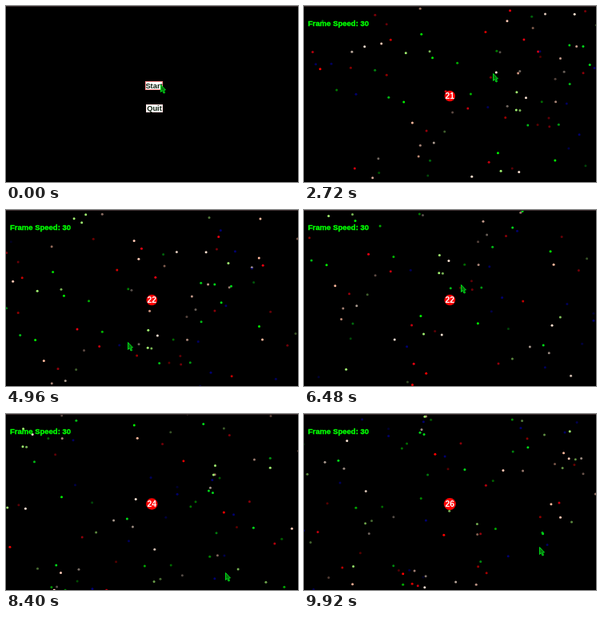
An HTML page with a canvas that plays this animation: 365 by 220 pixels, repeating every 10 s.

```html
<!DOCTYPE html>
<html lang="en">
<head>
<meta charset="utf-8">
<title>Dots</title>
<style>
html, body { margin: 0; width: 100%; height: 100%; overflow: hidden; background: #000; }
canvas { display: block; }
</style>
</head>
<body>
<canvas id="stage" width="365" height="220"></canvas>
<script>
const W = 365, H = 220, LOOP = 10000, STEP = 80;
const PLAY = 640, MOVE = 1120;
const SPEED = 6.9;        // pixels per step
const DENSITY = 92;       // dots per screen area
const CENTER = { x: 182.3, y: 112.5 };
const ctx = document.getElementById('stage').getContext('2d');

// Key points of the pointer tip: time, x, y
const pointerKeys = [
  [MOVE, 189, 97], [1600, 236, 84], [2720, 236, 84], [3680, 236, 88],
  [3920, 228, 139], [4480, 170, 75], [4960, 152, 165], [5760, 180, 175],
  [6480, 196, 93], [7440, 250, 130], [8400, 274, 198], [9920, 294, 166]
];
const scoreTimes = [1920, 3280, 7280, 8000, 8960, 9440];
const palette = ['#ffc8b4', '#ffb89c', '#f8e0d0', '#ff0000', '#e80010', '#00f000', '#00d818', '#a0f070', '#000070'];

function pointerAt(t) {
  const i = pointerKeys.findIndex(key => key[0] > t);
  const b = pointerKeys.at(i), a = i > 0 ? pointerKeys[i - 1] : b;
  const k = a === b ? 0 : (t - a[0]) / (b[0] - a[0]);
  return { x: a[1] + (b[1] - a[1]) * k, y: a[2] + (b[2] - a[2]) * k };
}

// The camera heads for the pointer at constant speed
function makeRoute() {
  const route = [], at = { x: 0, y: 0 };
  for (let t = 0; t < LOOP; t += STEP) {
    if (t >= MOVE) {
      const p = pointerAt(t);
      const angle = Math.atan2(p.y - CENTER.y, p.x - CENTER.x);
      at.x += SPEED * Math.cos(angle);
      at.y += SPEED * Math.sin(angle);
    }
    route.push({ ...at });
  }
  return route;
}
const route = makeRoute();

function seeded(seed) {
  return () => (seed = (seed * 16807) % 2147483647) / 2147483647;
}

// Scatter dots over everything the camera will see
function makeDots() {
  const random = seeded(90217);
  const xs = route.map(p => p.x), ys = route.map(p => p.y);
  const left = Math.min(...xs), top = Math.min(...ys);
  const width = Math.max(...xs) - left + W, height = Math.max(...ys) - top + H;
  const count = Math.round(DENSITY * width * height / (W * H));
  return Array.from({ length: count }, () => {
    const x = left + random() * width, y = top + random() * height;
    const eaten = route.findIndex(c =>
      Math.hypot(x - c.x - CENTER.x, y - c.y - CENTER.y) < 7);
    return {
      x, y,
      eaten: eaten < 0 ? Infinity : eaten,
      color: palette[Math.floor(random() * palette.length)],
      light: Math.min(1, .3 + random())
    };
  });
}
const dots = makeDots();

function disc(x, y, r, color) {
  ctx.fillStyle = color;
  ctx.beginPath();
  ctx.arc(x, y, r, 0, Math.PI * 2);
  ctx.fill();
}

function label(text, x, y, size, color, align, weight = 0) {
  ctx.font = `bold ${size}px "Liberation Sans", Arial, sans-serif`;
  ctx.textAlign = align;
  ctx.fillStyle = ctx.strokeStyle = color;
  ctx.fillText(text, x, y);
  if (weight) {
    ctx.lineWidth = weight;
    ctx.strokeText(text, x, y);
    ctx.lineWidth = 1;
  }
}

function drawPointer({ x, y }) {
  ctx.save();
  ctx.translate(Math.round(x) + .5, Math.round(y) + .5);
  ctx.beginPath();
  [[0, 0], [0, 9], [2, 7], [3.5, 10.5], [5, 10], [3.8, 6.5], [6, 6.5]]
    .forEach(p => ctx.lineTo(...p));
  ctx.closePath();
  ctx.fillStyle = '#06700c';
  ctx.fill();
  ctx.strokeStyle = '#00d818';
  ctx.stroke();
  ctx.restore();
}

function drawButton(text, x, y, w, h, edge) {
  ctx.fillStyle = '#fff';
  ctx.fillRect(x, y, w, h);
  ctx.strokeStyle = edge;
  ctx.strokeRect(x + .5, y + .5, w - 1, h - 1);
  label(text, x + w / 2, y + h - 2.3, 9.3, '#102010', 'center');
}

function drawMenu(t) {
  drawButton('Start', 174, 94, 22, 11, '#ff8c8c');
  drawButton('Quit', 175, 123, 21, 10, '#ffe0e0');
  drawPointer(t < 80 ? { x: 193, y: 98 } : t < 240 ? { x: 191, y: 98 } : { x: 189, y: 97 });
}

function drawDots(step) {
  const camera = route[step];
  for (const dot of dots) {
    if (step >= dot.eaten) continue;
    ctx.globalAlpha = dot.light;
    disc(dot.x - camera.x, dot.y - camera.y, 1.5, dot.color);
  }
  ctx.globalAlpha = 1;
}

function drawGame(t) {
  const eaten = scoreTimes.filter(s => t >= s).length;
  drawDots(t / STEP);
  disc(CENTER.x, CENTER.y, 6.5 + eaten * .17, '#ff0000');
  label(20 + eaten, CENTER.x, 116.1, 10.4, '#fff', 'center');
  label('Frame Speed: 30', 5, 25.4, 9.5, '#00ff00', 'left', .35);
  drawPointer(pointerAt(t));
}

function draw(now) {
  const t = Math.floor((now % LOOP) / STEP) * STEP;
  ctx.fillStyle = '#000';
  ctx.fillRect(0, 0, W, H);
  if (t < PLAY) drawMenu(t);
  else drawGame(t);
  ctx.fillStyle = '#3a2c2e';
  ctx.fillRect(0, 0, W, 1);
  requestAnimationFrame(draw);
}
requestAnimationFrame(draw);
</script>
</body>
</html>
```
